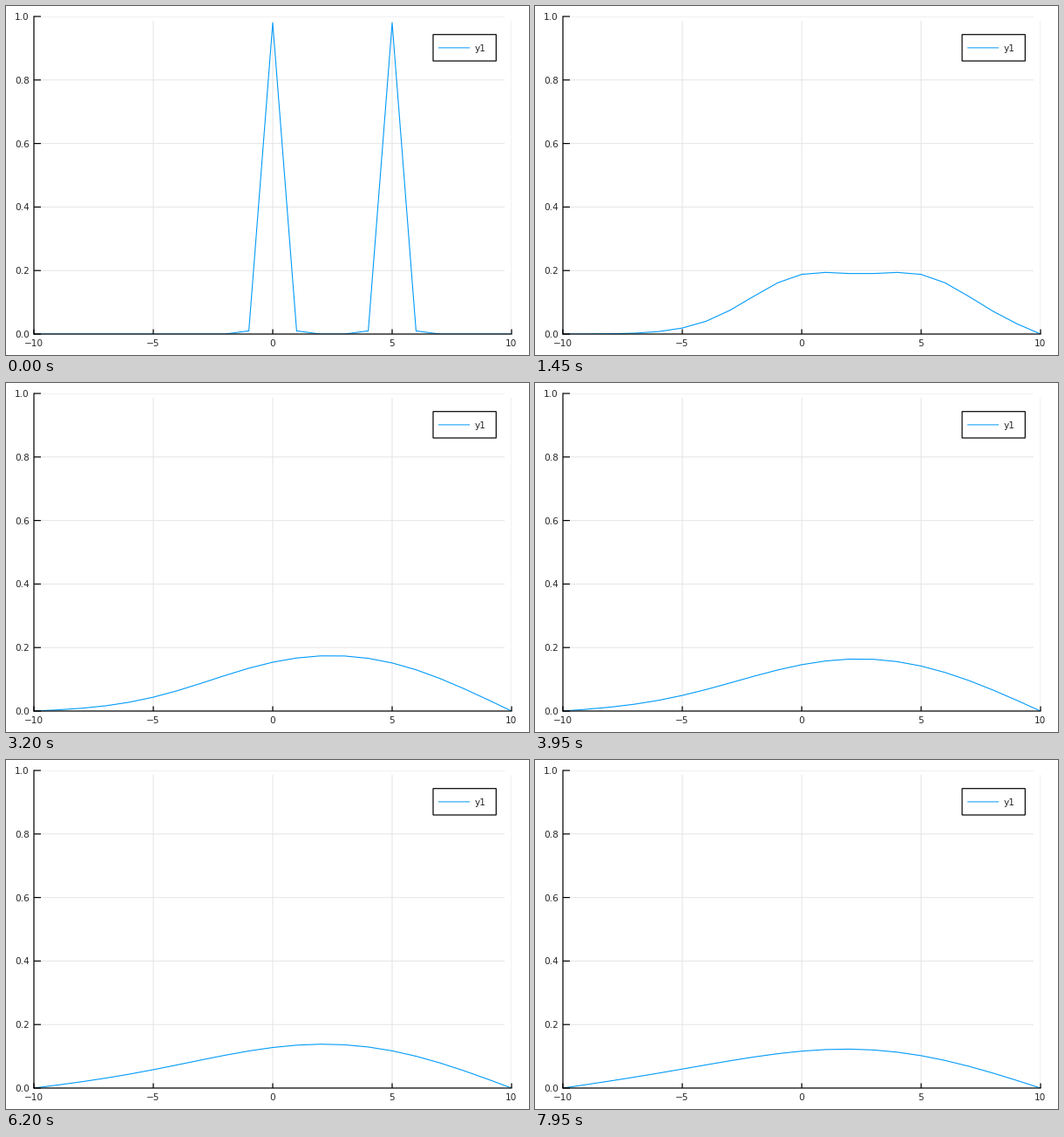
Animation of 600 by 400 pixels, one loop 8 s. Source, as a matplotlib script:

```python
import numpy as np
import matplotlib.pyplot as plt
from matplotlib.animation import FuncAnimation
from matplotlib.patches import Rectangle

W, H, DPI = 600, 400, 100
FRAMES, INTERVAL = 160, 50
STEPS_PER_FRAME, RATE = 10, 0.01
LEFT, RIGHT, TOP, BOTTOM = 32, 580, 12, 376
PX = 72 / DPI
BLUE, GRID = "#009afa", "#e5e5e5"

plt.rcParams["font.family"] = "DejaVu Sans"
plt.rcParams["path.snap"] = False
fig = plt.figure(figsize=(W / DPI, H / DPI), dpi=DPI, facecolor="white")
ax = fig.add_axes([0, 0, 1, 1])
ax.set_xlim(0, W)
ax.set_ylim(H, 0)
ax.axis("off")
plot_area = Rectangle((LEFT, TOP), RIGHT - LEFT, BOTTOM - TOP,
                      transform=ax.transData)


def px(x):
    return LEFT + (np.asarray(x) + 10) * (RIGHT - LEFT) / 20


def py(u):
    return BOTTOM - np.asarray(u) * (BOTTOM - TOP)


def stroke(x0, y0, x1, y1, color="black", z=5, width=1.2):
    line, = ax.plot([x0, x1], [y0, y1], color=color, lw=width * PX, zorder=z,
                    solid_capstyle="butt")
    return line


def grid_line(*ends):
    stroke(*ends, GRID, 1, 1).set_clip_path(plot_area)


def label(x, y, text, align):
    ax.text(x, y, text, ha=align, va="baseline", fontsize=10.5 * PX,
            color="#262626", zorder=6)


def diffuse():
    """Heat equation with ends held at zero, one row per frame."""
    u = np.zeros(21)
    u[[10, 15]] = 1
    rows = []
    for step in range(1, FRAMES * STEPS_PER_FRAME + 1):
        u[1:-1] += RATE * (u[2:] - 2 * u[1:-1] + u[:-2])
        if step % STEPS_PER_FRAME == 1:
            rows.append(u.copy())
    return rows


# Grid, ticks and tick labels
for v in (-10, -5, 0, 5, 10):
    x = px(v)
    grid_line(x, 17, x, BOTTOM)
    stroke(x, BOTTOM - 5.5, x, BOTTOM)
    label(x, 390, str(v).replace("-", "\u2212"), "center")
for v in np.arange(6) / 5:
    y = py(v)
    grid_line(LEFT + 8, y, 572, y)
    stroke(LEFT, y, LEFT + 8, y)
    label(26.7, y + 4, f"{v:.1f}", "right")

# Axes
stroke(LEFT, TOP - 0.5, LEFT, BOTTOM + 0.5)
stroke(LEFT - 0.5, BOTTOM, RIGHT + 0.5, BOTTOM)

# Legend
ax.add_patch(Rectangle((490, 32.7), 72.3, 30.3, fc="white", ec="black",
                       lw=1.2 * PX, zorder=4))
stroke(496, 47.9, 532, 47.9, BLUE, width=1)
label(538, 52, "y1", "left")

states = diffuse()
xs = px(np.arange(-10, 11))
curve, = ax.plot(xs, py(states[0]), color=BLUE, lw=1.1 * PX, zorder=3)
curve.set_clip_path(plot_area)


def update(i):
    curve.set_ydata(py(states[i]))
    return curve,


anim = FuncAnimation(fig, update, frames=FRAMES, interval=INTERVAL,
                     repeat=True, repeat_delay=0, blit=False)
plt.show()
```
